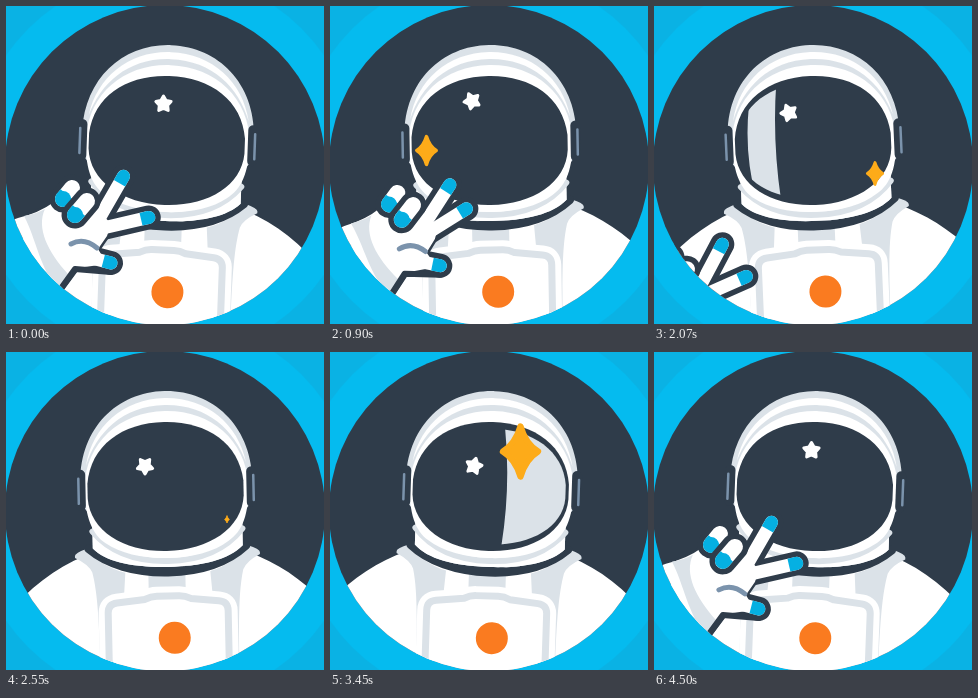
These frames come from a looping animation (318 px wide and 318 px high, 4530 ms). An HTML page with a canvas:

```html
<!DOCTYPE html>
<html lang="en">
<head>
<meta charset="utf-8">
<style>
html, body { margin: 0; width: 100%; height: 100%; overflow: hidden; background: #0ab2e4; }
canvas { display: block; width: 318px; height: 318px; }
</style>
</head>
<body>
<canvas id="stage" width="318" height="318"></canvas>
<script>
const ctx = document.getElementById('stage').getContext('2d');
const LOOP = 4530, TAU = Math.PI * 2, DEG = Math.PI / 180;
const DARK = '#2f3c4a', WHITE = '#fff', GREY = '#dbe2e8', CYAN = '#05b0e2', STEEL = '#7b93ac';
const ORANGE = '#fa7b20', GOLD = '#fdab19';

const path = d => new Path2D(d);
const shapes = {
  body: path('M-30 330V300C0 250 35 219 78 202L160 218L242 202C285 219 320 250 350 300V330Z'),
  strap: path('M68 202Q68 199 80 195Q94 213 118 220L116 246Q97 248 97 258V330H91C91 270 90 240 85 219Q82 211 68 204Z'),
  panel: path('M100 330V260Q100 251 109 250L137 247Q143 244 149 244H171Q177 244 183 247L211 250Q220 251 220 260V330'),
  shell: path('M75 128C76 74 114 39 161 39C208 39 246 74 247 128L243 155L236 164V195C222 209 195 215 161 215C126 215 99 209 86 195V164L79 155Z'),
  chin: path('M86 168H236V195C222 209 195 215 161 215C126 215 99 209 86 195Z'),
  chinShade: path('M86 178C104 200 130 209 161 209C192 209 218 200 236 178'),
  gloss: path('M81 112C88 73 120 46 161 46C202 46 234 73 241 112C230 79 203 53 161 53C119 53 92 79 81 112Z'),
  rim: path('M79 134C81 89 116 59 161 59C206 59 241 89 243 134C243 164 236 181 222 190C207 201 185 206 161 206C137 206 114 201 99 190C86 181 79 164 79 134Z'),
  visor: path('M82 130C86 92 118 70 160 70C202 70 234 92 238 130V145C236 178 202 199 160 199C118 199 84 178 82 145Z'),
  collar: path('M82 195C100 211 128 220 161 220C194 220 221 211 239 195'),
  palm: path('M-40 230L12 212Q33 207 48 196L62 185L89 200L105 218L101 230L92 243L101 258L71 262L57 281L20 330L-60 345Z'),
  armEdge: path('M105 266L69 263L56 281L40 303'),
  cuff: path('M18 210Q30 208 39 203C30 222 42 246 62 268L53 284C34 264 30 232 18 210Z'),
  crease: path('M65 238Q78 231 91 242')
};

// Linear interpolation through [time, value] keys, optionally eased per segment.
function track(t, keys, ease = u => u) {
  if (t <= keys[0][0]) return keys[0][1];
  for (let i = 1; i < keys.length; i++) {
    const [t0, a] = keys[i - 1], [t1, b] = keys[i];
    if (t <= t1) return a + (b - a) * ease((t - t0) / (t1 - t0));
  }
  return keys[keys.length - 1][1];
}
const smooth = u => u * u * (3 - 2 * u);

function fill(shape, color) {
  ctx.fillStyle = color;
  ctx.fill(shape);
}
function stroke(shape, color, width) {
  ctx.strokeStyle = color;
  ctx.lineWidth = width;
  ctx.stroke(shape);
}
function disc(x, y, r, color) {
  ctx.fillStyle = color;
  ctx.beginPath();
  ctx.arc(x, y, r, 0, TAU);
  ctx.fill();
}
function line(x0, y0, x1, y1, color, width) {
  ctx.strokeStyle = color;
  ctx.lineWidth = width;
  ctx.beginPath();
  ctx.moveTo(x0, y0);
  ctx.lineTo(x1, y1);
  ctx.stroke();
}
function local(draw) {
  ctx.save();
  draw();
  ctx.restore();
}
function turn(angle, x = 159, y = 159) {
  ctx.translate(x, y);
  ctx.rotate(angle);
  ctx.translate(-x, -y);
}
function mirrored(draw) {
  draw();
  local(() => {
    ctx.translate(321, 0);
    ctx.scale(-1, 1);
    draw();
  });
}

function drawSuit() {
  fill(shapes.body, WHITE);
  mirrored(() => fill(shapes.strap, GREY));
  ctx.fillStyle = GREY;
  ctx.fillRect(141, 222, 37, 16);
  stroke(shapes.panel, WHITE, 19);
  fill(shapes.panel, WHITE);
  stroke(shapes.panel, GREY, 7);
  disc(166, 286, 16, ORANGE);
}

function meridian(x, reverse) {
  const end = 158 + (x - 160) * 0.85, mid = 2 * x - end;
  const [y0, y1] = reverse ? [205, 65] : [65, 205];
  ctx.lineTo(end, y0);
  ctx.quadraticCurveTo(mid, 135, end, y1);
}

function drawGlare(t) {
  const s = t < 2600 ? t + 2100 : t;
  if (s < 3200 || s > 4350) return;
  const left = track(s, [[3200, 244], [3450, 177], [3900, 134], [4300, 72]]);
  const right = track(s, [[3500, 250], [3900, 195], [4350, 72]]);
  local(() => {
    ctx.translate(160, 134.5);
    ctx.scale(0.96, 0.9);
    ctx.translate(-160, -134.5);
    ctx.clip(shapes.visor);
    ctx.beginPath();
    meridian(left, false);
    meridian(right, true);
    ctx.fillStyle = GREY;
    ctx.fill();
  });
}

function drawHelmet(t) {
  stroke(shapes.collar, DARK, 9);
  fill(shapes.shell, GREY);
  fill(shapes.chin, WHITE);
  stroke(shapes.chinShade, GREY, 6);
  fill(shapes.gloss, WHITE);
  fill(shapes.rim, WHITE);
  fill(shapes.visor, DARK);
  mirrored(() => {
    line(75, 121, 75, 152, DARK, 10);
    line(73, 125, 73, 150, STEEL, 2.5);
  });
  drawGlare(t);
}

function drawStar(t) {
  const x = track(t, [[0, 157.5], [900, 142], [1620, 131], [2550, 139], [3450, 144], [3900, 156], [4530, 157.5]]);
  const y = track(t, [[0, 98], [900, 95], [1620, 100], [2550, 114], [3450, 114], [3900, 109], [4530, 98]]);
  const spin = track(t, [[0, 0], [900, -25], [1620, -80], [2550, -108], [3450, -130], [4530, -144]]);
  ctx.beginPath();
  for (let i = 0; i < 10; i++) {
    const a = spin * DEG - Math.PI / 2 + i * TAU / 10, r = i % 2 ? 4.4 : 8;
    ctx.lineTo(x + r * Math.cos(a), y + r * Math.sin(a));
  }
  ctx.closePath();
  ctx.fillStyle = ctx.strokeStyle = WHITE;
  ctx.lineWidth = 3;
  ctx.fill();
  ctx.stroke();
}

function drawSparkle(t, peak, x, y, size) {
  const offset = Math.abs(t - peak) / 585;
  if (offset >= 1) return;
  const h = size * Math.cos(offset * Math.PI / 2), w = h * 0.7;
  const p = 0.88, q = 0.26;
  ctx.beginPath();
  ctx.moveTo(x, y - h * p);
  for (const [dx, dy, cx, cy] of [[1, 0, 1, -1], [0, 1, 1, 1], [-1, 0, -1, 1], [0, -1, -1, -1]])
    ctx.quadraticCurveTo(x + cx * w * q, y + cy * h * q, x + dx * w * p, y + dy * h * p);
  ctx.closePath();
  ctx.fillStyle = ctx.strokeStyle = GOLD;
  ctx.lineWidth = h * 0.22;
  ctx.fill();
  ctx.stroke();
}

function finger(x, y, degrees, length) {
  const a = degrees * DEG;
  return [x, y, x + length * Math.cos(a), y + length * Math.sin(a)];
}

// A capsule whose outer end wears a cyan tip.
function paintFinger([x0, y0, x1, y1], width, tip) {
  line(x0, y0, x1, y1, WHITE, width);
  const k = tip / Math.hypot(x1 - x0, y1 - y0);
  ctx.lineCap = 'butt';
  line(x1 - (x1 - x0) * k, y1 - (y1 - y0) * k, x1, y1, CYAN, width);
  ctx.lineCap = 'round';
  disc(x1, y1, width / 2, CYAN);
}

function drawHand(t) {
  if (t > 2350 && t < 3480) return;
  const dx = track(t, [[1850, 0], [2350, -135], [3480, -135], [3840, -7], [3900, -7], [4400, 0]], smooth);
  const dy = track(t, [[1850, 0], [2350, 140], [3480, 140], [3840, -11], [3900, -11], [4400, 0]], smooth);
  const phase = t > 3000 ? t - LOOP : t;
  const close = (1 - Math.cos(phase / 1700 * TAU)) / 2;
  const reach = 1 - 0.1 * close;
  const long = [
    finger(94, 211, -60 + 6 * close, 47 * reach),
    finger(97, 222, -13 - 16 * close, 47 * reach),
    [82, 251, 105, 257]
  ];
  const curled = [[66, 182, 57, 193], [81, 195, 69, 209]];

  // Before the hand leaves it is at rest, so its offset is zero.
  if (t > 1850) ctx.translate(dx, dy);
  for (const f of long) line(...f, DARK, 24);
  stroke(shapes.palm, DARK, 5);
  fill(shapes.palm, WHITE);
  fill(shapes.cuff, GREY);
  stroke(shapes.armEdge, DARK, 6);
  for (const f of long) paintFinger(f, 13, 8);
  for (const f of curled) {
    line(...f, DARK, 27);
    paintFinger(f, 16, 6);
  }
  stroke(shapes.crease, STEEL, 5);
}

function render(t) {
  const sway = time => -2.7 * DEG * Math.sin((time - 630) / LOOP * TAU);
  ctx.fillStyle = '#0ab2e4';
  ctx.fillRect(0, 0, 318, 318);
  disc(159, 159, 193, '#05bbef');
  disc(159, 159, 160, DARK);
  local(() => {
    ctx.lineCap = ctx.lineJoin = 'round';
    ctx.beginPath();
    ctx.arc(159, 159, 160, 0, TAU);
    ctx.clip();
    local(() => {
      turn(sway(t));
      drawSuit();
      drawHelmet(t);
    });
    drawSparkle(t, 735, 96.5, 144.5, 17.5);
    drawSparkle(t, 2085, 221, 167.5, 12.5);
    drawSparkle(t, 3435, 190.5, 99.5, 28.5);
    drawStar(t);
    local(() => {
      turn(sway(t) - sway(0));
      drawHand(t);
    });
  });
}

function tick() {
  render(performance.now() % LOOP);
  requestAnimationFrame(tick);
}
tick();
</script>
</body>
</html>
```
